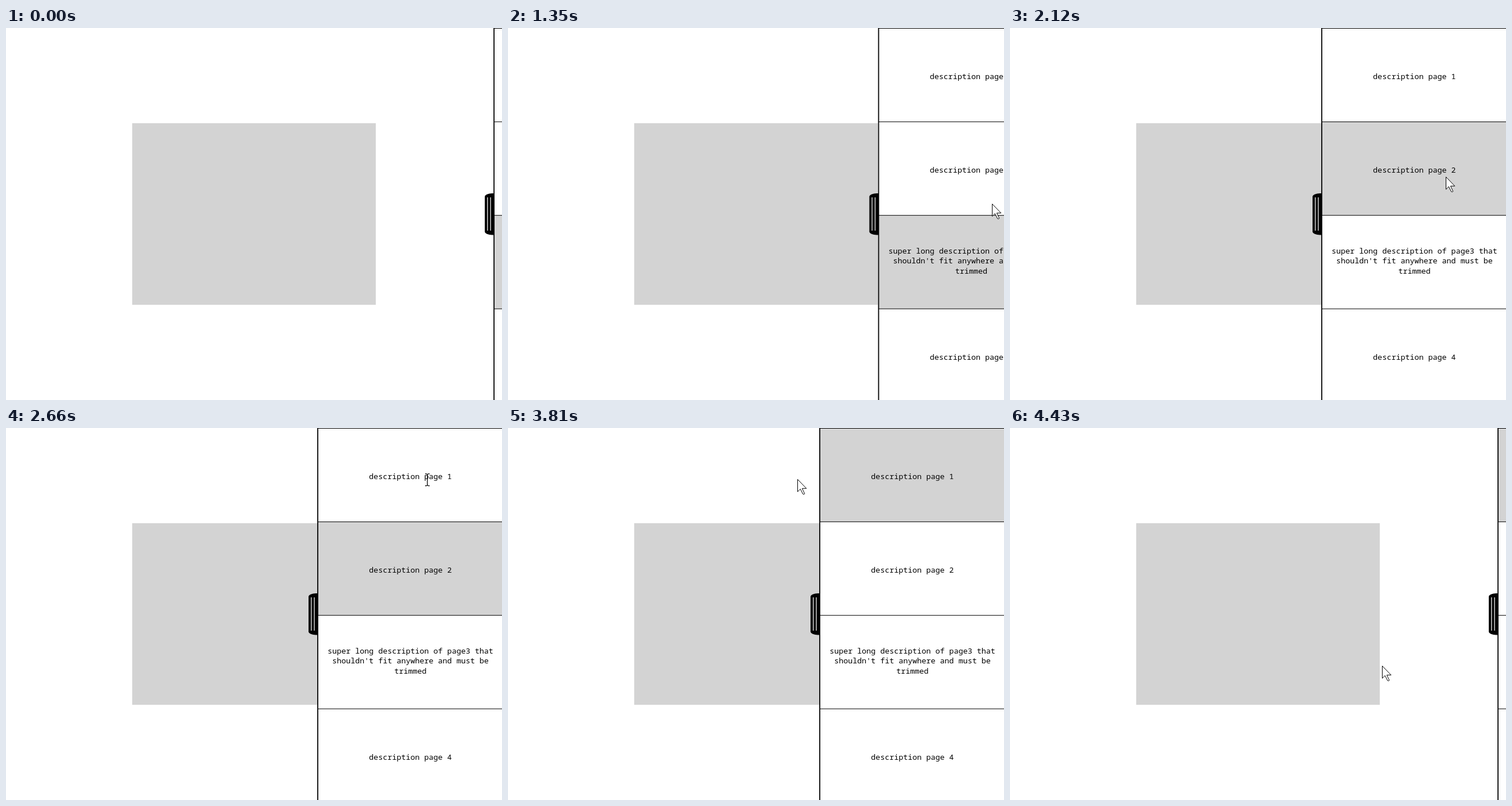
Animation of 864x648 px, one loop 4.58 s. Source, as an HTML page:

```html
<!DOCTYPE html>
<html lang="en">
<head>
<meta charset="utf-8">
<title>Sliding page panel</title>
<style>
  html, body { margin: 0; width: 100%; height: 100%; overflow: hidden; background: #fff; }
  svg { display: block; width: 864px; height: 648px; }
  text { font: 13.36px "Noto Sans Mono", "DejaVu Sans Mono", monospace; text-anchor: middle; }
</style>
</head>
<body>
<svg viewBox="0 0 864 648">
  <rect width="864" height="648" fill="#fff"/>
  <rect x="219.8" y="165.8" width="424.4" height="316.4" fill="#d3d3d3"/>
  <g id="panel">
    <path d="M1 288H-2a13 6 0 0 0-13 6V354.5a13 6 0 0 0 13 6H1Z"/>
    <path d="M-11 295h1.5v58h-1.5zM-5.7 295h1.5v58h-1.5z" fill="#d3d3d3"/>
    <rect x=".2" width="324" height="648"/>
    <g id="pages"></g>
  </g>
  <path id="arrow" d="M.5.5V22L5.3 17.3 9.7 26Q11 27.3 12.8 25.6L8.4 16.3H15.8Z" fill="#fff" stroke="#000"/>
  <path id="beam" d="M-4-10.2H-1.6L0-9 1.6-10.2H4M0-9V9.5M-4 10.7H-1.6L0 9.5 1.6 10.7H4"
        fill="none" stroke="#000" stroke-width="1.3"/>
</svg>
<script>
const LOOP = 4580, TICK = 76.96, FIRST = 120;
const OPEN_X = 542, CLOSED_X = 849, SLIDE = 380;
const OPEN_AT = 1118.5, CLOSE_AT = 3765;
const PAGE = 162.9, BASELINE = 89, LEADING = 17.5;
const $ = id => document.getElementById(id);
const panel = $('panel'), arrow = $('arrow'), beam = $('beam');

const labels = [
  ['description page 1'],
  ['description page 2'],
  ['super long description of page3 that', "shouldn't fit anywhere and must be", 'trimmed'],
  ['description page 4']
];

const linear = u => u;
const easeIn = u => u ** 3;
const easeOut = u => 1 - (1 - u) ** 3;
const smooth = u => u * u * (3 - 2 * u);

const entry = { x: 789, y: 529 };
const moves = [
  { from: 120, to: 196, x: 848, y: 313, ease: linear },
  { from: 351, to: 890, x: 844, y: 306, ease: linear },
  { from: 1200, to: 1890, x: 759, y: 259, ease: easeIn },
  { from: 2275, to: 2660, x: 734, y: 90, ease: linear },
  { from: 3275, to: 3352, x: 708, y: 92, ease: linear },
  { from: 3352, to: 3968, x: 493, y: 89, ease: easeOut },
  { from: 3968, to: 4430, x: 648, y: 414, ease: smooth }
];

function add(parent, tag, attrs) {
  const el = document.createElementNS('http://www.w3.org/2000/svg', tag);
  for (const k in attrs) el.setAttribute(k, attrs[k]);
  return parent.appendChild(el);
}

const cells = labels.map((lines, i) => {
  const top = i * PAGE;
  const cell = add($('pages'), 'rect', { x: 2, y: top + 1, width: 322, height: PAGE - 1 });
  const first = top + BASELINE - 11 * (lines.length - 1);
  lines.forEach((line, n) => {
    const y = Math.round(first + n * LEADING);
    add($('pages'), 'text', { x: 162.5, y }).textContent = line;
  });
  return cell;
});

const progress = (t, from, to) => Math.min(1, Math.max(0, (t - from) / (to - from)));
const slide = (t, from) => smooth(progress(t, from, from + SLIDE));

function pointerAt(t) {
  let { x, y } = entry;
  for (const m of moves) {
    const u = m.ease(progress(t, m.from, m.to));
    x += (m.x - x) * u;
    y += (m.y - y) * u;
  }
  return [Math.round(x), Math.round(y)];
}

function overText(x, y) {
  return x > 632 && x < 777 && [0, 1].some(i => Math.abs(y - 84.5 - i * PAGE) < 9);
}

function draw(time) {
  const ms = time % LOOP;
  // the picture advances in even ticks
  const t = ms < FIRST ? 0 : FIRST + Math.floor((ms - FIRST + 3) / TICK) * TICK;

  const open = slide(t, OPEN_AT) - slide(t, CLOSE_AT);
  const x = CLOSED_X + (OPEN_X - CLOSED_X) * open;
  panel.setAttribute('transform', `translate(${x} 0)`);

  const chosen = t < 2115 ? 2 : t < 2885 ? 1 : 0;
  cells.forEach((c, i) => c.setAttribute('fill', i === chosen ? '#d3d3d3' : '#fff'));

  const [px, py] = pointerAt(t);
  const text = open > 0.99 && overText(px, py);
  const shown = t >= FIRST;
  arrow.setAttribute('visibility', shown && !text ? 'visible' : 'hidden');
  beam.setAttribute('visibility', shown && text ? 'visible' : 'hidden');
  (text ? beam : arrow).setAttribute('transform', `translate(${px} ${py})`);
}

const start = performance.now();
function frame() {
  draw(performance.now() - start);
  requestAnimationFrame(frame);
}
draw(0);
requestAnimationFrame(frame);
</script>
</body>
</html>
```
